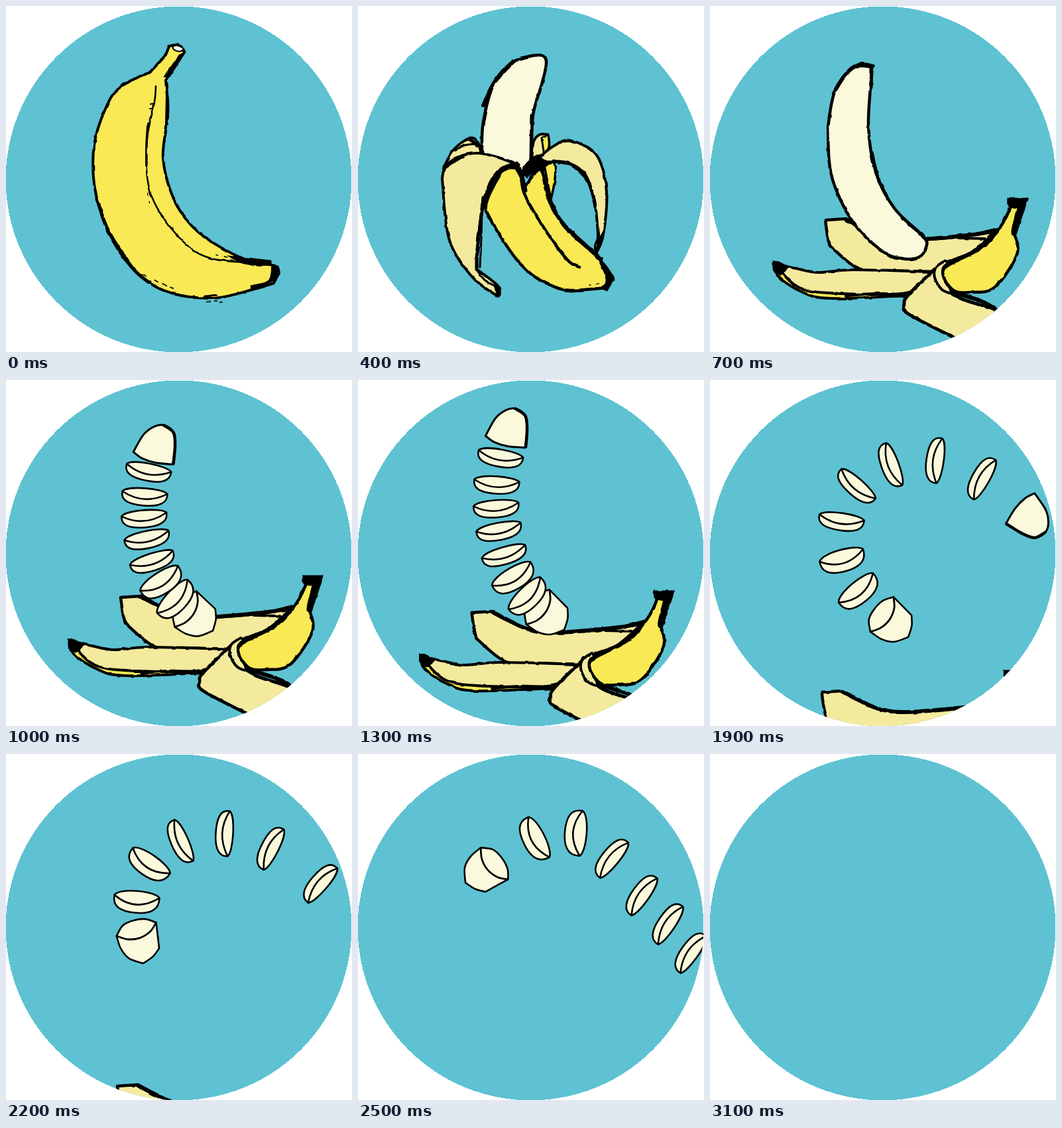
An HTML page that plays this animation: 522 px wide and 522 px high, repeating every 3400 ms.

```html
<!DOCTYPE html>
<html lang="en">
<head>
<meta charset="utf-8">
<title>Banana</title>
<style>
html, body { margin: 0; width: 100%; height: 100%; overflow: hidden; background: #fff; }
svg { display: block; width: 100vw; height: 100vh; }
</style>
</head>
<body>
<svg viewBox="0 0 522 522">
  <defs>
    <clipPath id="disc"><circle cx="260.5" cy="261.5" r="261"/></clipPath>
    <filter id="rough" filterUnits="userSpaceOnUse" x="0" y="0" width="522" height="522" color-interpolation-filters="sRGB">
      <feTurbulence type="fractalNoise" baseFrequency="0.08" numOctaves="2" seed="4"/>
      <feDisplacementMap in="SourceGraphic" scale="3" xChannelSelector="R" yChannelSelector="G"/>
    </filter>
  </defs>
  <circle cx="260.5" cy="261.5" r="261" fill="#5ec2d2" shape-rendering="crispEdges"/>
  <g clip-path="url(#disc)">
    <g id="art" stroke="#000" stroke-linejoin="round" stroke-linecap="round"></g>
  </g>
</svg>
<script>
const YELLOW = '#f9e955', PALE = '#f4ea9e', CREAM = '#fbf9dc';
const art = document.getElementById('art');

let seed = 7;
const random = () => (seed = seed * 16807 % 2147483647) / 2147483647;

// Smooth curve through "x,y" points; "|" marks a sharp corner.
function smooth(spec) {
  let d = '', last = null;
  for (const part of spec.split('|')) {
    const p = part.trim().split(/\s+/).map(s => s.split(',').map(Number));
    if (last) p.unshift(last);
    else d = 'M' + p[0];
    for (let i = 0; i < p.length - 1; i++) {
      const a = p[i - 1] || p[i], b = p[i], c = p[i + 1], e = p[i + 2] || c;
      const h1 = b.map((v, k) => (v + (c[k] - a[k]) / 6).toFixed(1));
      const h2 = c.map((v, k) => (v - (e[k] - b[k]) / 6).toFixed(1));
      d += `C${h1} ${h2} ${c}`;
    }
    last = p[p.length - 1];
  }
  return d;
}

const path = (d, fill, width) => `<path d="${d}" fill="${fill}" stroke-width="${width}"/>`;
const shape = (spec, fill, width = 4) => path(smooth(spec) + 'Z', fill, width);
const line = (spec, width = 3) => path(smooth(spec), 'none', width);
const blot = spec => shape(spec, '#000', 1);
const place = (x, y, a, body) =>
  `<g transform="translate(${x} ${y}) rotate(${a})">${body}</g>`;
const rough = body => `<g filter="url(#rough)">${body}</g>`;

// Short pen strokes scattered along a straight run.
function flecks(x, y, dx, dy, count) {
  let out = '';
  for (let i = 0; i < count; i++) {
    const t = (i + random()) / count, n = 0.08 + random() * 0.08;
    const px = x + dx * t, py = y + dy * t + random() * 3;
    out += path(`M${px},${py}l${dx * n},${dy * n}`, 'none', 1 + random());
  }
  return out;
}

function wholeBanana() {
  return rough(
    shape('246,61 | 239,76 217,100 | 172,122 150,155 133,210 134,275 153,338 190,395 240,430 310,441 375,427 404,418 | ' +
      '409,408 | 408,392 | 355,380 290,341 255,295 237,230 244,165 241,112 | 269,70 | 262,60 253,59 246,61', YELLOW) +
    line('226,121 224,145 212,210 219,285 262,350 310,381 395,388', 2.5) +
    line('214,178 212,210 212,240', 3.5) +
    blot('261,74 | 271,69 | 247,107 | 238,107 | 261,74') +
    blot('401,390 | 411,391 | 410,410 370,430 | 369,422 | 396,414 401,390') +
    blot('335,377 | 365,380 400,384 | 396,391 360,389 335,377') +
    blot('242,112 | 246,155 240,205 | 242,112') +
    line('137,290 154,338 190,394 214,416', 5) +
    line('217,148 222,147 | 221,155 | 217,155', 2) +
    line('300,438 318,436', 3) +
    '<ellipse cx="259" cy="64" rx="7.5" ry="4.2" fill="#fff" stroke-width="2" transform="rotate(14 259 64)"/>' +
    flecks(205, 404, 45, 20, 4) + flecks(310, 371, 30, 10, 3) + flecks(290, 446, 40, -2, 3) + flecks(213, 270, 4, 30, 2));
}

function halfPeeled() {
  return rough(
    shape('131,240 | 145,216 169,199 181,206 186,224 | 155,229 131,246 131,240', PALE) +
    line('147,218 161,210 181,208') +
    line('170,202 180,210', 5) +
    shape('262,232 | 265,205 274,194 287,194 | 288,212 280,228 262,236', PALE) +
    shape('277,199 | 287,194 | 288,212 281,225 | 277,199', YELLOW, 3) +
    shape('281,240 | 296,238 297,262 291,292 | 281,240', YELLOW, 3.5) +
    shape('187,222 189,175 206,115 235,84 272,74 284,83 278,115 264,165 262,230 | 251,255 | 236,239 | 187,222', CREAM, 4.5) +
    line('189,150 206,115 234,84', 6) + line('262,165 261,232', 5) +
    shape('238,244 | 218,250 194,296 200,322 235,377 262,405 290,421 320,429 375,425 | 385,413 | ' +
      '360,378 310,331 287,283 275,247 252,272 | 246,258 238,244', YELLOW, 4.5) +
    line('246,252 251,283 280,334 316,383 334,394', 4.5) +
    line('240,238 247,258 252,278', 7) +
    line('283,274 291,299 312,331 366,381', 5.5) +
    blot('359,375 | 375,392 387,411 | 376,430 | 366,426 | 374,412 359,375') +
    blot('263,228 | 278,224 300,232 | 282,244 281,259 | 272,247 255,260 | 248,246 263,228') +
    shape('274,228 294,212 320,203 360,225 375,280 370,345 360,372 | ' +
      '357,362 362,344 352,275 320,238 284,235 274,228', PALE) +
    line('295,234 322,239 342,254 353,280 358,303', 5) +
    blot('359,366 | 365,347 373,333 | 368,356 359,372 359,366') +
    shape('127,260 132,241 150,228 180,222 210,228 237,238 | 201,266 184,330 179,397 | ' +
      '209,420 214,432 | 208,436 169,405 137,350 127,260', PALE) +
    line('237,239 216,247 201,266 193,291', 7) +
    line('189,289 180,367 179,397', 5) +
    line('187,309 186,350 184,394') +
    line('179,398 192,414 210,424') + line('208,423 212,435', 6) +
    line('130,244 142,236 157,227', 5) +
    flecks(336, 423, 28, -6, 2));
}

// The dropped peel drifts slightly left as it sinks.
function peel(drop) {
  return rough(place(-0.45 * Math.sqrt(drop), drop, 0,
    shape('174,323 | 205,321 | 258,347 302,353 385,347 435,336 | 392,374 342,401 | ' +
      '270,399 225,397 181,362 | 177,345 174,323', PALE, 4.5) +
    line('205,322 228,334 260,348 302,353 388,346 428,340', 6) +
    line('375,350 415,351', 4) +
    shape('97,388 | 103,408 138,431 180,441 300,437 | 300,431 200,432 97,388', YELLOW) +
    shape('97,388 | 130,396 165,402 215,398 335,401 | 300,432 200,434 135,425 97,388', PALE) +
    blot('95,386 | 104,386 120,395 | 106,406 | 96,400 95,386') +
    line('205,437 250,434 294,436', 4.5) +
    shape('344,392 | 300,435 293,450 300,465 372,502 | 430,520 | 490,490 | 430,459 365,434 344,392', PALE, 5) +
    shape('355,384 341,394 339,410 350,428 366,434 | 351,400 360,387', PALE) +
    shape('451,293 | 452,307 432,341 390,375 352,398 366,428 395,432 430,424 463,375 459,343 | ' +
      '467,314 478,292 | 451,293', YELLOW, 4.5) +
    blot('449,290 | 480,290 | 461,348 | 455,340 463,305 | 450,301 449,290') +
    line('433,340 415,360 390,375 362,385', 6) +
    line('364,431 411,446 434,460', 6)));
}

function fruit() {
  return rough(
    shape('178,182 183,255 215,325 260,370 290,381 315,379 326,364 322,348 278,305 250,250 239,180 245,92 | ' +
      '215,93 188,130 178,182', CREAM, 4.5) +
    line('190,125 201,108 214,94 229,88 246,91', 6) + line('244,94 243,118', 5) +
    line('244,220 252,255 264,283', 5) + line('290,320 322,347', 5));
}

// w is half the length, h half the thickness.
function slice(x, y, a, h) {
  const w = 34;
  return place(x, y, a,
    path(`M${-w},${-0.4 * h}C${-0.8 * w},${-1.1 * h} ${0.8 * w},${-1.1 * h} ${w},${-0.5 * h}` +
      `C${1.05 * w},${0.6 * h} ${0.6 * w},${h} 0,${h}C${-0.7 * w},${h} ${-1.05 * w},${0.6 * h} ${-w},${-0.4 * h}Z`, CREAM, 2.6) +
    path(`M${-w},${-0.4 * h}Q0,${h} ${w},${-0.5 * h}`, 'none', 2.6));
}

const tail = (x, y, a) => place(x, y, a,
  shape('-16,-31 | 22,-23 | 31,-10 36,7 | 22,25 4,32 -16,32 | -28,18 -30,0 -26,-18 -16,-31', CREAM, 2.6) +
  line('-16,-31 -6,-18 -2,0 -6,18 -16,32', 2.8));

const head = (x, y, a) => place(x, y, a,
  shape('-33,10 | -17,-16 0,-28 15,-29 28,-18 30,2 26,30 | 0,27 -20,20 -33,10', CREAM, 3) +
  line('14,-29 28,-18 30,2 27,29', 4.5));

// A train is the curve the pieces ride on, keyed at every second piece.
const stacked = [[285, 351], [235, 299], [213, 228], [209, 158], [225, 73]];
const arching = [[273, 362], [200, 272], [220, 161], [340, 121], [485, 205]];
const leaving = [[194, 176], [329, 119], [427, 212], [501, 299], [560, 395]];
const leaning = stacked.map((p, i) => p.map((v, k) => (8 * v + 9 * arching[i][k] - leaving[i][k]) / 16));
const cut = stacked.map(([x, y]) => [x, 383 - (383 - y) * 0.92]);

function pointAt(keys, slot) {
  const end = keys.length - 1;
  const i = Math.max(0, Math.min(end - 1, Math.floor(slot / 2))), f = slot / 2 - i;
  const beyond = (a, b, c) => a.map((v, k) => 3 * v - 3 * b[k] + c[k]);
  const b = keys[i], c = keys[i + 1];
  const a = keys[i - 1] || beyond(b, c, keys[i + 2]);
  const e = keys[i + 2] || beyond(c, b, keys[i - 1]);
  return b.map((v, k) => v + f / 2 * (c[k] - a[k] +
    f * (2 * a[k] - 5 * v + 4 * c[k] - e[k] + f * (3 * (v - c[k]) + e[k] - a[k]))));
}

// Every piece faces along the curve; twist adds a turn per slot.
function pieces(keys, shift = 0, twist = 0) {
  let out = '';
  for (let i = 0; i <= 8; i++) {
    const slot = i + shift;
    const [x, y] = pointAt(keys, slot);
    const [x0, y0] = pointAt(keys, slot - 0.3), [x1, y1] = pointAt(keys, slot + 0.3);
    const heading = Math.atan2(y1 - y0, x1 - x0) * 180 / Math.PI + twist * slot;
    if (i === 0) out += tail(x, y, heading + 180);
    else if (i === 8) out += head(x, y, heading + 72);
    else out += slice(x, y, heading + 90, i < 3 ? 17 : 13.5);
  }
  return out;
}

const scenes = [
  wholeBanana(),
  halfPeeled(),
  peel(0) + fruit(),
  peel(5) + pieces(cut),
  peel(28) + pieces(stacked),
  peel(104) + pieces(leaning),
  peel(148) + pieces(arching),
  peel(178) + pieces(arching, 1.85),
  pieces(leaving, 0, -3),
  pieces(leaving, 2.8, -3),
  ''
];

const LOOP = 3400, FIRST = 400, STEP = 300;
let shown = -1;

function draw(now) {
  const t = now % LOOP;
  const step = t < FIRST ? 0 : 1 + Math.floor((t - FIRST) / STEP);
  if (step !== shown) {
    art.innerHTML = scenes[step];
    shown = step;
  }
}

const start = performance.now();
function tick() {
  draw(performance.now() - start);
  requestAnimationFrame(tick);
}
tick();
</script>
</body>
</html>
```
